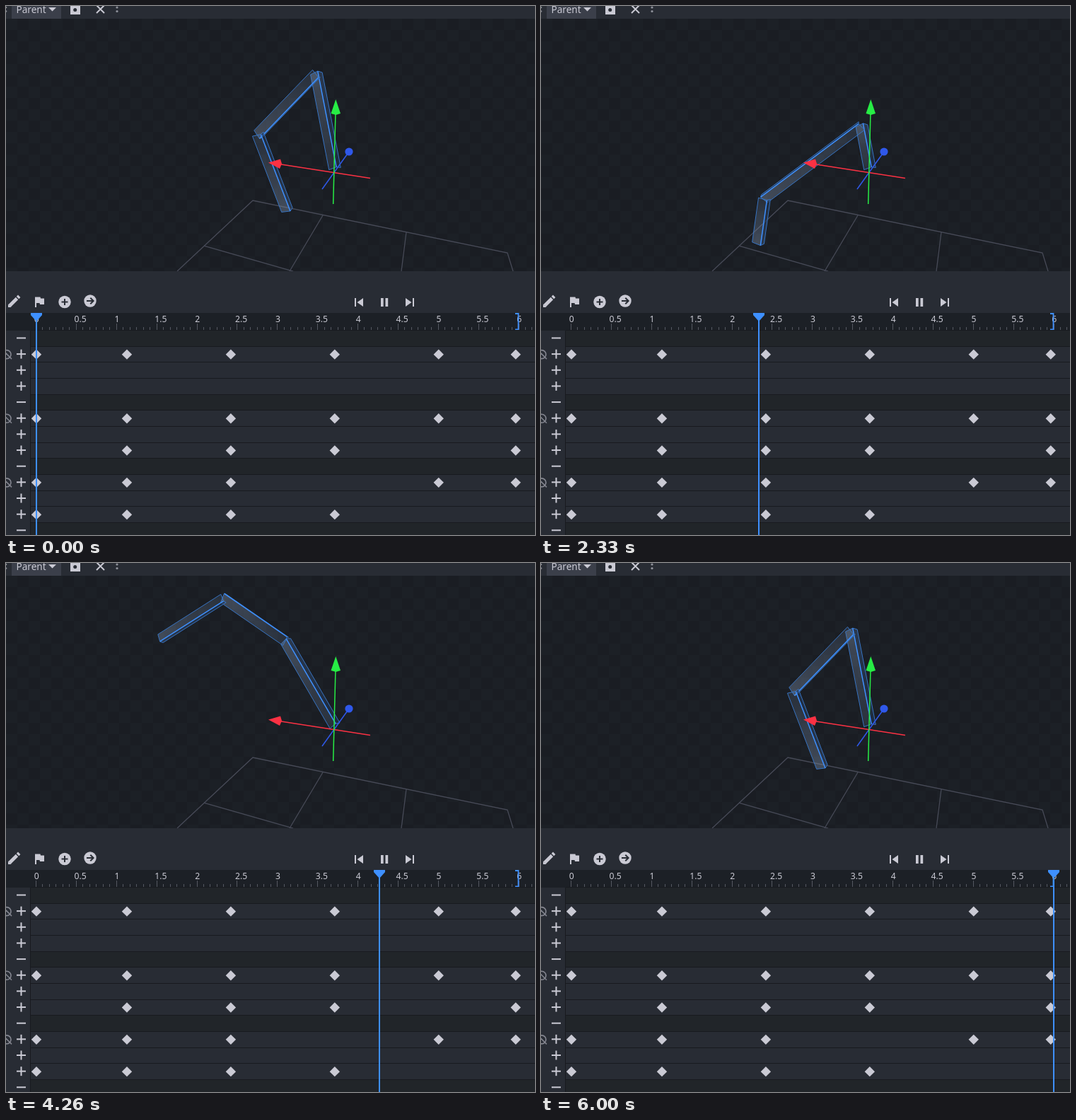
An HTML page with a canvas that plays this animation: 748x748 px, repeating every 6060 ms.

```html
<!DOCTYPE html>
<html>
<head>
<meta charset="utf-8">
<style>
html, body { margin: 0; width: 100%; height: 100%; overflow: hidden; background: #282c34 }
canvas { display: block }
</style>
</head>
<body>
<canvas id="stage" width="748" height="748"></canvas>
<script>
const ctx = document.getElementById('stage').getContext('2d');
const LOOP = 6060, FPS = 15, SNAP = 24, ZERO = 43, SECOND = 113.75;
const PANEL = '#282c34', DARK = '#1a1d23', LINE = '#181a1f', ICON = '#cacad4', BLUE = '#3e90ff';
const BASE = [465, 230];

// Key poses: time in 1/24 s, then degrees below "left" and length of each bone.
const rest = [-79, 137, 46, 119, 111, 115];
const poses = [
  [0, ...rest],
  [27, -39, 130, 5, 111, 23, 98],
  [58, -82, 57, 39, 176, 86, 61],
  [73.5, -73, 93, 10, 141, 70, 81],
  [89, -63, 135, -37, 134, 28, 143],
  [102, -60, 138, -35, 107, 33, 106],
  [120, -51, 134, -15, 110, 10, 82],
  [143, ...rest],
  [150, ...rest]
];
const keyTimes = [0, 27, 58, 89, 120, 143];
const missingKeys = { 1: '', 5: '', 7: '04', 9: '3', 11: '45' };

const clamp = (v, low, high) => Math.min(high, Math.max(low, v));
const timeX = seconds => ZERO + seconds * SECOND;

function rect(color, x, y, w, h) {
  ctx.fillStyle = color;
  ctx.fillRect(x, y, w, h);
}
function trace(points) {
  ctx.beginPath();
  points.forEach(p => ctx.lineTo(...p));
}
function poly(color, ...points) {
  trace(points);
  ctx.fillStyle = color;
  ctx.fill();
}
function line(color, width, ...points) {
  trace(points);
  ctx.strokeStyle = color;
  ctx.lineWidth = width;
  ctx.stroke();
}
function disc(color, x, y, r) {
  ctx.beginPath();
  ctx.arc(x, y, r, 0, 7);
  ctx.fillStyle = color;
  ctx.fill();
}
function text(str, x, y, size) {
  ctx.font = size + 'px "Noto Sans", sans-serif';
  ctx.fillStyle = ICON;
  ctx.fillText(str, x, y);
}
function plus(color, x, y, r) {
  line(color, 2, [x - r, y], [x + r, y]);
  line(color, 2, [x, y - r], [x, y + r]);
}

function poseAt(t) {
  const i = poses.findIndex(p => p[0] > t * SNAP);
  const from = poses[i - 1], to = poses[i];
  const k = (t * SNAP - from[0]) / (to[0] - from[0]);
  return from.map((v, j) => v + (to[j] - v) * k).slice(1);
}

function drawBone(from, to, ridge) {
  const dx = to[0] - from[0], dy = to[1] - from[1], length = Math.hypot(dx, dy);
  const ux = dx / length, uy = dy / length, half = 5 + 3.5 * Math.abs(uy);
  const at = (p, side, along = 0) =>
    [p[0] - uy * side * half + ux * along, p[1] + ux * side * half + uy * along];
  const startA = at(from, -1), startB = at(from, 1), endA = at(to, -1), endB = at(to, 1);
  const startRidge = at(from, ridge, 2), endRidge = at(to, ridge, 3);
  const shade = ctx.createLinearGradient(...from, ...to);
  shade.addColorStop(0, 'rgba(105,130,165,.18)');
  shade.addColorStop(1, 'rgba(130,148,175,.38)');
  poly(shade, startA, startB, endB, endRidge, endA);
  const [p, q] = ridge > 0 ? [startB, endB] : [startA, endA];
  poly('rgba(20,38,66,.5)', startRidge, p, q, endRidge);
  line('#3673c2', 1, startRidge, startA, endA, endRidge, endB, startB, startRidge);
  line(BLUE, 1.5, startRidge, endRidge);
}

function drawArm(t) {
  const pose = poseAt(t);
  const roll = 1 - 1.8 * Math.cos(t * Math.PI * 2 / 3);
  const bend = pose[4] - pose[2];
  const ridges = [.3, clamp(roll, -.8, .9), clamp((42 - bend) / 5, -.45, .8)];
  let joint = BASE;
  ridges.forEach((ridge, i) => {
    const angle = pose[2 * i] * Math.PI / 180, length = pose[2 * i + 1];
    const next = [joint[0] - Math.cos(angle) * length, joint[1] + Math.sin(angle) * length];
    drawBone(joint, next, ridge);
    joint = next;
  });
}

function drawViewport(t) {
  rect(DARK, 0, 18, 748, 357);
  for (let y = 0; y < 23; y++)
    for (let x = y % 2; x < 47; x += 2) rect('#1c2026', x * 16, 18 + y * 16, 16, 16);
  const grid = '#474a57';
  line(grid, 1.3, [242, 375], [349, 275], [709, 349], [717, 375]);
  line(grid, 1.3, [280, 339], [406, 375]);
  line(grid, 1.3, [448, 296], [401, 375]);
  line(grid, 1.3, [566, 320], [559, 375]);

  drawArm(t);

  const red = '#fb3143', green = '#27ec45', blue = '#2f58ea';
  line(blue, 1.5, [447, 259], [485, 206]);
  disc(blue, 485, 206, 5.6);
  line(red, 1.5, [515, 243.5], [386, 223.5]);
  poly(red, [371, 221.5], [388, 216.5], [390, 223], [387, 230]);
  line(green, 1.5, [462.7, 280], [466, 150]);
  poly(green, [466.3, 132], [473, 152], [466.5, 154], [459.5, 152]);
}

function drawHeader() {
  rect(PANEL, 0, 0, 748, 18);
  rect('#3b3f4a', 8, 0, 70, 18);
  text('Parent', 14.5, 9.5, 13.6);
  poly(ICON, [60, 2], [71, 2], [65.5, 7.5]);
  rect(ICON, 91, 0, 14, 12);
  disc(PANEL, 97.7, 5.5, 2.5);
  line(ICON, 2, [128, -1], [139, 10]);
  line(ICON, 2, [139, -1], [128, 10]);
  for (const y of [2, 7.5]) {
    disc('#8f929b', 157, y, 1.6);
    disc('#8f929b', 0, y, 1.3);
  }
}

function drawToolbar() {
  rect(PANEL, 0, 375, 748, 59);
  line(ICON, 4.8, [5.2, 423.8], [15.5, 413.5]);
  line(ICON, 4.8, [16.5, 412.5], [18.7, 410.3]);
  poly(ICON, [3, 426], [3, 421.5], [7.5, 426]);
  poly(ICON, [41, 411.5], [48.5, 411.5], [49, 413.5], [54, 413.5], [54, 422], [48, 422], [47.5, 420], [43, 420], [43, 426], [41, 426]);
  disc(ICON, 83, 418.5, 8.7);
  plus(PANEL, 83, 418.5, 4.5);
  disc(ICON, 119, 417, 8.7);
  line(PANEL, 2, [114, 417], [123, 417]);
  line(PANEL, 2, [119.3, 412.7], [123.6, 417], [119.3, 421.3]);
  rect(ICON, 493, 413, 2, 12);
  poly(ICON, [505, 413], [505, 425], [496.5, 419]);
  rect(ICON, 530, 413, 3.7, 12);
  rect(ICON, 536.5, 413, 3.7, 12);
  poly(ICON, [565, 413], [565, 425], [573.5, 419]);
  rect(ICON, 575, 413, 2, 12);
}

function drawRuler() {
  rect('#1c2026', 0, 434, 748, 25);
  for (let i = 0; i < 75; i++) {
    const x = timeX(i / 12), major = i % 6 === 0;
    rect('#555861', Math.round(x) - 1, major ? 449 : 454, 1, major ? 9 : 4);
    if (major) text(String(i / 12), x - 3.3, 447, 12.2);
  }
  line(BLUE, 1.8, [720, 435], [724.5, 435], [724.5, 457.5], [720, 457.5]);
}

function drawRows() {
  rect(PANEL, 0, 459, 748, 289);
  for (let row = 0; row < 13; row++) {
    const y = 469.5 + row * 22.65, top = Math.round(y - 11.3);
    if (row % 4 === 0) rect('#212529', 35, top, 713, 23);
    rect(LINE, 35, top, 713, 1);
    if (row % 4) plus(ICON, 21.5, y, 6.5);
    else line(ICON, 2, [15, y], [28, y]);
    if (row % 4 === 1) {
      disc('#858791', 1, y + .5, 6.8);
      disc(PANEL, 1, y + .5, 5.2);
      line('#858791', 1.5, [-5, y - 6], [8, y + 7]);
    }
    if (!(row in missingKeys)) continue;
    keyTimes.forEach((key, i) => {
      if (missingKeys[row].includes(i)) return;
      const x = timeX(key / SNAP), cy = y + .5, r = 7.2;
      poly(ICON, [x - r, cy], [x, cy - r], [x + r, cy], [x, cy + r]);
    });
  }
  rect(LINE, 34, 459, 1, 289);
}

function drawPlayhead(t) {
  const x = Math.floor(timeX(t) + .4);
  rect(BLUE, x - 1, 440, 2, 308);
  poly(BLUE, [x - 8, 434], [x + 8, 434], [x + 8, 437], [x, 446], [x - 8, 437]);
}

function frame() {
  // Motion advances in 15 steps per second, rounded down to 10 ms.
  const now = (performance.now() - start) % LOOP;
  const t = Math.floor((now + 7) * FPS / 1000) / FPS;
  drawViewport(t);
  drawHeader();
  drawToolbar();
  drawRuler();
  drawRows();
  drawPlayhead(t);
  requestAnimationFrame(frame);
}
const start = performance.now();
frame();
</script>
</body>
</html>
```
